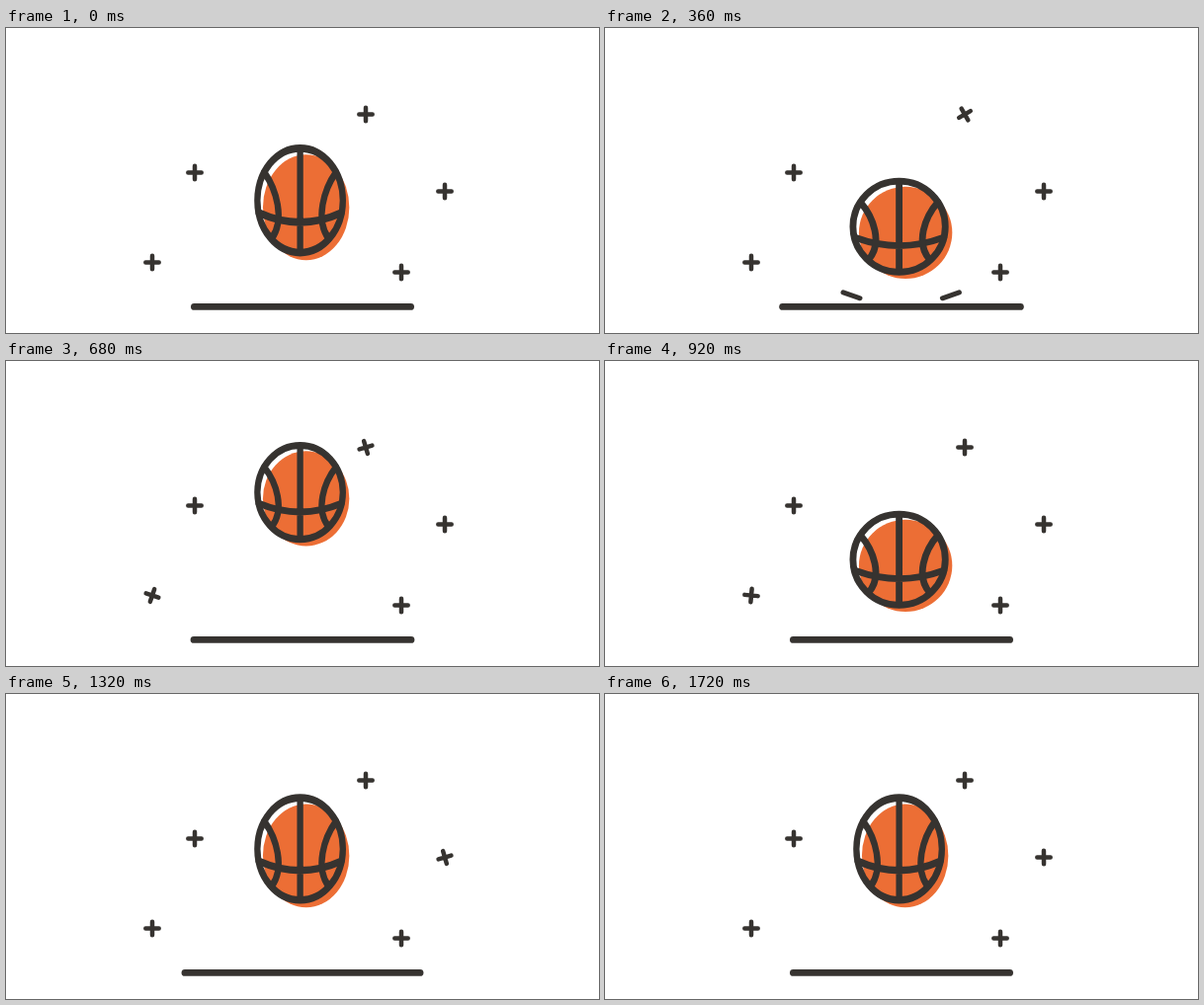
Write an HTML page that moves like this. It is 600 by 309 pixels and loops after 1.76 s.

```html
<!DOCTYPE html>
<html lang="en">
<head>
<meta charset="utf-8">
<title>Bouncing ball</title>
<style>
  html, body { margin: 0; width: 100%; height: 100%; overflow: hidden; background: #fff; }
  svg { display: block; width: 100%; height: 100%; }
  .ink { fill: none; stroke: #363330; stroke-linecap: round; }
</style>
</head>
<body>
<svg viewBox="0 0 600 309">
  <g class="ink" stroke-width="4.5" id="sparks"></g>
  <path class="ink" stroke-width="6.8" id="floor"/>
  <g id="ball">
    <circle cx="6.5" cy="6.2" r="47" fill="#ec6e35"/>
    <g class="ink" stroke-width="6.8">
      <circle r="46.5"/>
      <path d="M0-46V46M-45 11Q0 28 45 11"/>
      <path d="M-39-25C-26-10-16 17-31 34M39-25C26-10 16 17 31 34"/>
    </g>
  </g>
  <path class="ink" stroke-width="5" id="dashes"/>
</svg>
<script>
const LOOP = 1760, BOUNCE = 880, APEX = 640, STEP = 40;
const byId = id => document.getElementById(id);
const ball = byId('ball'), floor = byId('floor'), dashes = byId('dashes'), sparks = byId('sparks');

const mix = (a, b, u) => a + (b - a) * u;
const progress = (t, from, to) => Math.min(1, Math.max(0, (t - from) / (to - from)));
const smooth = u => u * u * (3 - 2 * u);
const easeOut = (u, power) => 1 - (1 - u) ** power;

// Bezier easing with control points (x1, 0) and (x2, 1)
function bezierEase(x, x1, x2) {
  let low = 0, high = 1;
  for (let i = 0; i < 24; i++) {
    const s = (low + high) / 2, r = 1 - s;
    if (3 * s * r * r * x1 + 3 * s * s * r * x2 + s ** 3 < x) low = s; else high = s;
  }
  return smooth(low);
}

// Each spark: x, y and, if it spins, the start of its half turn
const SPIN = 750;
const sparkList = [[191, 146.5], [364, 87.5, 70], [444, 165.5, 990], [148, 237.5, 530], [400, 247.5]]
  .map(([x, y, start = LOOP]) => {
    const node = document.createElementNS(sparks.namespaceURI, 'path');
    node.setAttribute('d', 'M-6.7 0H6.7M0-6.7V6.7');
    sparks.append(node);
    return { node, x, y, start };
  });

function drawBall(phase) {
  const fall = Math.abs((phase - APEX + BOUNCE * 1.5) % BOUNCE - BOUNCE / 2);
  const y = 132.5 + 117.5 * bezierEase(fall / 440, .76, .52);
  const squash = easeOut(progress(fall, 240, 440), 1.5);
  const scaleX = mix(.93, 1.19, squash);
  const scaleY = mix(mix(1, 1.138, progress(fall, 0, 240)), .62, squash);
  ball.setAttribute('transform', `translate(297.6 ${y}) scale(${scaleX} ${scaleY})`);
}

function drawFloor(phase) {
  const spread = 10.8 * (smooth(progress(phase, 120, 360)) - smooth(progress(phase, 360, 720)));
  floor.setAttribute('d', `M${190.4 - spread} 282.4H${409.6 + spread}`);
}

function drawDashes(phase) {
  const outer = mix(32, 59, easeOut(progress(phase, 160, 400), 2.5));
  const inner = mix(32, 59, progress(phase, 240, 440) ** 2);
  const side = sign => {
    const point = d => `${299.7 + sign * d} ${288.4 - .35 * d}`;
    return `M${point(inner)}L${point(outer)}`;
  };
  dashes.setAttribute('d', outer - inner > .1 ? side(-1) + side(1) : '');
}

function draw(now) {
  const t = Math.floor(now % LOOP / STEP) * STEP;
  const phase = t % BOUNCE;
  drawBall(phase);
  drawFloor(phase);
  drawDashes(phase);
  for (const { node, x, y, start } of sparkList) {
    const angle = 180 * smooth(progress(t, start, start + SPIN));
    node.setAttribute('transform', `translate(${x} ${y}) rotate(${angle})`);
  }
}

const begin = performance.now();
function tick() {
  draw(performance.now() - begin);
  requestAnimationFrame(tick);
}
tick();
</script>
</body>
</html>
```
